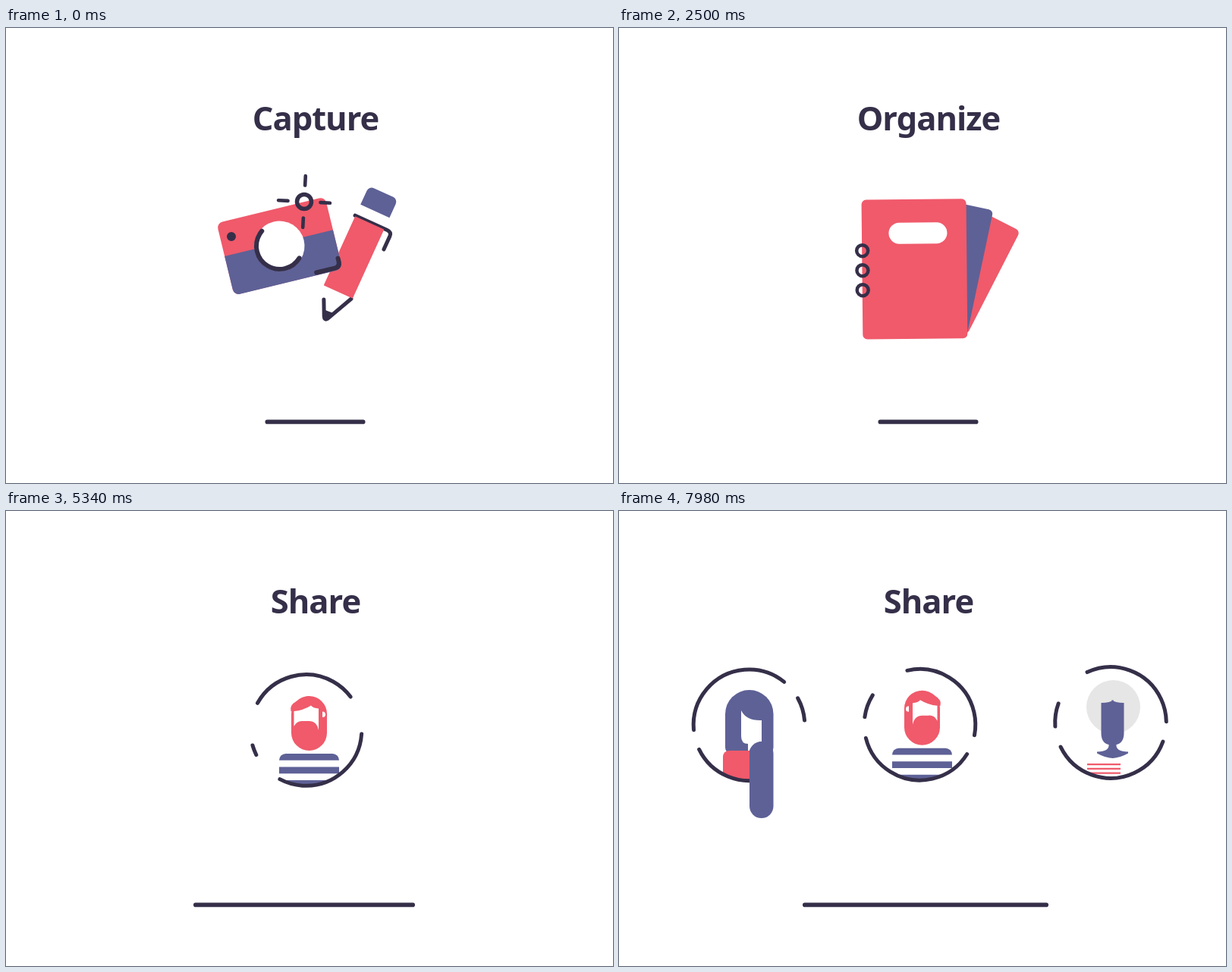
Animation, 800 px wide and 600 px high, one loop 8000 ms. Source, as an HTML page with a canvas:

```html
<!DOCTYPE html>
<html lang="en">
<head>
<meta charset="utf-8">
<title>Capture, Organize, Share</title>
<style>
html, body { margin: 0; width: 100%; height: 100%; overflow: hidden; background: #fff; }
canvas { display: block; width: 800px; height: 600px; }
</style>
</head>
<body>
<canvas id="stage" width="800" height="600"></canvas>
<script>
const c = document.getElementById('stage').getContext('2d');
const LOOP = 8000, DARK = '#352f49', RED = '#f05a6b', BLUE = '#5e6196', GREY = '#e6e6e6', WHITE = '#fff';
const RAD = Math.PI / 180;

// Motion helpers
const unit = (t, a, b) => Math.min(1, Math.max(0, (t - a) / (b - a)));
const ease = (t, a, b) => { const u = unit(t, a, b); return u * u * (3 - 2 * u); };
const hump = (t, a, b) => Math.sin(Math.PI * unit(t, a, b)) ** 2;
const mix = (a, b, u) => a.map((v, i) => v + (b[i] - v) * u);
function bezier(points, u) {
  while (points.length > 1) points = points.slice(1).map((p, i) => mix(points[i], p, u));
  return points[0];
}

// Drawing helpers
function at(x, y, deg, scale, draw) {
  c.save();
  c.translate(x, y);
  c.rotate(deg * RAD);
  c.scale(scale, scale);
  draw();
  c.restore();
}
function rect(x, y, w, h, r, color) {
  if (w <= 0 || h <= 0) return;
  c.fillStyle = color;
  c.beginPath();
  c.roundRect(x, y, w, h, r);
  c.fill();
}
function disc(x, y, r, color) {
  c.fillStyle = color;
  c.beginPath();
  c.arc(x, y, r, 0, 7);
  c.fill();
}
function shape(d, color) {
  c.fillStyle = color;
  c.fill(new Path2D(d));
}
function stroke(d, width) {
  c.strokeStyle = DARK;
  c.lineWidth = width;
  c.stroke(new Path2D(d));
}
function arc(x, y, r, from, to, width) {
  if (width <= 0) return;
  c.strokeStyle = DARK;
  c.lineWidth = width;
  c.beginPath();
  c.arc(x, y, r, from * RAD, to * RAD);
  c.stroke();
}
const ring = (x, y, r, width) => arc(x, y, r, 0, 360, width);
// Box by centre, size, angle, top and bottom corner radius
function box([x, y, w, h, deg, r, r2 = r], color) {
  at(x, y, deg, 1, () => rect(-w / 2, -h / 2, w, h, [r, r, r2, r2], color));
}
// Gooey streak along a path over the last 50 ms
function trail(pos, t, width, color) {
  c.strokeStyle = color;
  c.lineWidth = width;
  c.beginPath();
  for (let i = 0; i <= 10; i++) c.lineTo(...pos(t - 50 + 5 * i));
  if (width > 0) c.stroke();
}
function title(word, alpha) {
  c.globalAlpha = alpha;
  c.fillStyle = DARK;
  c.fillText(word, 408, 135);
  c.globalAlpha = 1;
}

function ground(t) {
  const mid = 407.5 - 14.5 * ease(t, 4720, 4960) + 11 * ease(t, 7400, 7980);
  const half = 66 - 28 * hump(t, 780, 1330) + 66 * hump(t, 1330, 1950)
    - 28 * hump(t, 3950, 4390) + 80 * ease(t, 4390, 4750) + 16 * ease(t, 7400, 7980);
  stroke(`M${mid - half + 2.8} 519.4H${mid + half - 2.8}`, 5.6);
}

// Binder pose: cover x, y, angle; hinge x, y; angles of the two pages
const upright = [389.5, 318, -.5, 458.5, 405, 12, 27.2];
const tilted = [381, 310.5, -12.2, 465, 383, 3.8, 16.2];
const coverSize = [138, 184];
function page(x, y, deg, w, h) {
  const s = Math.sin(deg * RAD), k = Math.cos(deg * RAD);
  return [x - w / 2 * k + h / 2 * s, y - w / 2 * s - h / 2 * k, w, h, deg, 6, 6];
}
const coverBox = ([x, y, deg]) => [x, y, ...coverSize, deg, 6, 6];
const redPage = (p, k = 1) => page(p[3], p[4], p[6], 60 * k, 154 * k);
const bluePage = (p, k = 1) => page(p[3], p[4], p[5], 60 * k, 168 * k);

// Parts leave the first scene, scatter, then gather as the binder
function flight(from, far, home, t) {
  const p = mix(mix(from, far, ease(t, 780, 1500)), home, ease(t, 1580, 2130));
  p[1] -= 45 * hump(t, 760, 1250);
  return p;
}
const ringHome = y => [upright[0] - 68.5, upright[1] + y, 7.5, 4.5];

function flashRing(t) {
  const gather = ease(t, 1580, 2130);
  const pos = s => mix(bezier([[393, 229], [360, 420], [400, 60], [475, 65]], unit(s, 1000, 1640)), ringHome(-25), ease(s, 1580, 2130));
  const [x, y] = pos(t), [px, py] = pos(t - 50);
  const r = 9.5 - 2 * ease(t, 1000, 1300);
  c.strokeStyle = DARK;
  c.lineWidth = 5.5 - 1.5 * ease(t, 1000, 1300) + .5 * gather;
  at(x, y, Math.atan2(py - y, px - x) / RAD, 1, () => {
    c.beginPath();
    c.roundRect(-r, -r, Math.hypot(x - px, y - py) + 2 * r, 2 * r, r);
    c.stroke();
  });
}
function pencil(k, sway) {
  at(458.5, 302.5, 24.5 + sway, k, () => {
    rect(-21, -94, 42, 27, [7, 7, 0, 0], BLUE);
    shape('M-8.4 79L6.4 78L2 88L-3.5 87Z', DARK);
    stroke('M-21.5 -51H25Q31.5 -51 31.5 -45V-26', 5);
    stroke('M-13 67L-3.5 87Q-1 92 2 88L19.5 51', 5);
  });
}
function cameraDetails(k, sway) {
  at(360.5, 287.5, -13.7 + sway, k, () => {
    stroke('M39 45.5H64Q71 45.5 71 38V34', 6);
    disc(0, 0, 33, WHITE);
    arc(0, 0, 30.5, 45, 234, 6);
  });
}
function rays(k) {
  for (let i = 0; i < 4 && k > 0; i++)
    at(393, 229, 3 + i * 90, 1, () => stroke(`M${34 - 12.5 * k} 0H34`, 4.6 * k));
}

function capture(t) {
  const sway = .7 * Math.sin(2 * Math.PI * unit(t, 0, 780)), k = 1 - ease(t, 780, 900);
  const cover = flight([458.5, 302.5, 42, 100, 24.5 + sway, 1, 1], [282, 325.5, 140, 186, -25.8, 7, 7], coverBox(upright), t);
  const red = flight([360.5, 287.5, 147, 98, -13.7 + sway, 8, 8], [424.5, 407, 142, 103, -9.7, 6, 6], redPage(upright), t);
  const blue = flight([365.8, 309.4, 147, 53, -13.7 + sway, 0, 8], [410.5, 407, 142, 103, -9.7, 6, 6], bluePage(upright), t);
  if (k) pencil(k, sway);
  if (t < 1100) box(cover, RED);
  box(red, RED);
  box(blue, BLUE);
  if (k) cameraDetails(k, sway);
  if (t >= 1100) box(cover, RED);
  slot(t, cover);
  ring(...flight([297, 275, 3, 6], [115.5, 336, 2.9, 5.8], ringHome(1), t));
  if (t > 800) ring(...flight([421, 381, 0, 0], [269, 432, 2.9, 5.8], ringHome(27), t));
  rays(1 - ease(t, 740, 860));
  flashRing(t);
}

// White label, later the hollow of the red frame
function slot(t, [x, y, , , deg]) {
  const grow = ease(t, 2000, 2300);
  const label = [5, -47.5, 77 * grow, 28 * grow, 14 * grow];
  const [ox, oy, w, h, r] = mix(mix(label, [0, 0, 56, 29, 8], ease(t, 4000, 4560)), [-3.5, -6, 32, 22, 6], ease(t, 4600, 4950));
  at(x, y, deg, 1, () => rect(ox - w / 2, oy - h / 2, w, h, r, WHITE));
}

function binder(t) {
  const pose = mix(upright, tilted, ease(t, 2450, 3500));
  const fan = hump(t, 3950, 4320);
  pose[5] += 10 * fan;
  pose[6] += 18 * fan;
  const fold = 1 - ease(t, 4080, 4340);
  const tab = (i, [x, y, w, h, deg], color) => {
    const g = ease(t, 2600 + i * 200, 2900 + i * 200) * (1 - ease(t, 3940, 4080));
    if (g) at(x, y, deg, 1, () => rect(w / 2 - 8, h / 2 - 169 + i * 35, 8 + 12 * g, 32, 5, color));
  };
  const red = redPage(pose, fold), blue = bluePage(pose, fold);
  const frame = mix(coverBox(pose), [409.5, 289.5, 68, 41, -24.2, 4, 4], ease(t, 4000, 4560));
  const cover = mix(frame, [399.5, 280, 47, 72, 0, 23.5, 23.5], ease(t, 4600, 4950));
  box(red, RED);
  tab(2, red, RED);
  box(blue, BLUE);
  tab(1, blue, BLUE);
  box(cover, RED);
  tab(0, cover, RED);
  slot(t, cover);
  const k = 1 - ease(t, 3980, 4240);
  at(pose[0], pose[1], pose[2], 1, () => {
    for (let i = -1; i < 2; i++) ring(-68.5, 1 + 26 * i * k, 7.5 * k, 4.5 * k);
  });
}

// Drops swirling around the middle portrait
function swirl(t) {
  const spiral = (deg, radius) => s => {
    const a = (deg + .31 * (s - 4580)) * RAD, r = radius(s);
    return [396 + r * Math.cos(a), 289 + r * Math.sin(a)];
  };
  const born = ease(t, 4200, 4400);
  trail(spiral(-141, s => 40 + 65 * hump(s, 4200, 4800)), t, 23 * born * (1 - ease(t, 4850, 5000)), BLUE);
  trail(spiral(-90, s => 73 + 69 * hump(s, 4200, 4960)), t, 14 * born * (1 - ease(t, 4900, 5150)), DARK);
}

// Broken circle whose arcs grow back from their ends
const arcs = [[-137, -21], [-2, 134], [154, 180]];
function orbit(x, y, turn, t, born, hidden = 0) {
  arcs.forEach(([from, to], i) => {
    const g = ease(t, born + i * 90, born + i * 90 + 330);
    const span = (to - from - (i ? 0 : hidden)) * g;
    if (span > 3) arc(x, y, 73.3, to - span + turn + 1, to + turn - 1, 5);
  });
}
function inCircle(x, y, draw) {
  c.save();
  c.beginPath();
  c.arc(x, y, 74, 0, 7);
  c.clip();
  draw();
  c.restore();
}
const spin = t => .0181 * (t - 6160);

function beardedPortrait(t) {
  const lift = ease(t, 6160, 8050), x = 395.5 + lift, y = 289 - 7.3 * lift;
  inCircle(x, y, () => {
    const top = y + 31 + 48 * (1 - ease(t, 4950, 5250));
    for (let i = 0; i < 3; i++) rect(360, top + 17.5 * i, 79, 8.7, i ? 0 : [9, 9, 0, 0], BLUE);
  });
  c.save();
  c.translate(399.5, y - 289);
  c.scale(1 - 2 * ease(t, 7150, 7400), 1);
  rect(-23.5, 244, 47, 72, 23.5, RED);
  shape('M-24 264Q-26 256 -17 251Q-8 245 0 244L6 256Q-4 258 -10 262Q-18 265 -24 264Z', RED);
  shape('M-20 264Q-8 263 2.5 256.5Q5 260 12.5 260.5V289Q10 277 0 277H-8Q-16 276 -20 284Z', WHITE);
  shape('M17.5 264.5Q21.5 264.5 21.5 268.5Q21.5 272 17.5 272Z', WHITE);
  c.restore();
  orbit(x, y, spin(t), t, 5000);
}

function longHairPortrait(t) {
  const dx = 4.2 * (1 - ease(t, 6000, 6800)), dy = 2.7 * (1 - ease(t, 7000, 7980));
  const hair = ease(t, 6190, 6400), braid = ease(t, 6350, 6650);
  at(dx, dy, 0, 1, () => {
    if (hair) {
      at(172, 268, 0, .45 + .55 * hair, () => rect(-32, -32, 63.5, 84, [31.7, 31.7, 8, 8], BLUE));
      inCircle(171.5, 282.3, () => rect(137, 361 - 45 * ease(t, 6270, 6500), 35, 50, [8, 0, 0, 0], RED));
      c.globalAlpha = braid;
      shape('M161 263Q168 277 188 276V304C180 305 174 310 172 316H170V307Q161 307 161 297Z', WHITE);
      c.globalAlpha = 1;
    }
    orbit(171.5, 282.3, 209 - spin(t), t, 6020, 31);
    if (braid) rect(172, 304, 31.5, 20 + 81 * braid, 15.7, BLUE);
  });
}

function curlyPortrait(t) {
  const head = ease(t, 7680, 7850);
  disc(651.5, 258.5, 35.5 * ease(t, 7580, 7820), GREY);
  at(650.5, 280, 0, head, () => {
    // Right half of head, neck and collar, mirrored for the left
    for (const side of [1, -1]) {
      c.save();
      c.scale(side, 1);
      shape('M-1 -31Q3 -27 15 -27V13C15 22 11 27 5 28Q4 37 20.5 37.5V39.5Q9 46 -1 46Z', BLUE);
      c.restore();
    }
  });
  inCircle(648, 279, () => {
    for (let i = 0; i < 3; i++) rect(617, 333 + 5.7 * i, 44 * ease(t, 7740, 7980), 2.3, 0, RED);
  });
  orbit(648, 279, 21 + spin(t) - spin(7980), t, 7400);
}

// Drops thrown from the middle portrait to the sides
function drop(t, start, end, width, color, points) {
  if (t < start || t > end) return;
  const size = ease(t, start, start + 100) * (1 - .5 * ease(t, end - 50, end));
  trail(s => bezier(points, unit(s, start, end)), t, width * size, color);
}
function share(t) {
  if (t >= 6000) longHairPortrait(t);
  beardedPortrait(t);
  if (t >= 7400) curlyPortrait(t);
  drop(t, 5930, 6230, 33, BLUE, [[385, 335], [195, 330], [252, 200], [172, 230]]);
  drop(t, 5863, 6293, 23, RED, [[385, 310], [238, 200], [250, 385], [190, 345]]);
  drop(t, 7240, 7730, 30, BLUE, [[420, 295], [540, 270], [620, 200], [650, 280]]);
  drop(t, 7280, 7790, 18, RED, [[405, 330], [480, 390], [560, 390], [635, 341]]);
}

function draw(t) {
  c.fillStyle = WHITE;
  c.fillRect(0, 0, 800, 600);
  c.lineCap = c.lineJoin = 'round';
  c.font = 'bold 43.5px "Noto Sans", "Open Sans", sans-serif';
  c.letterSpacing = '-1px';
  c.textAlign = 'center';
  title('Capture', 1 - ease(t, 840, 1080));
  title('Organize', ease(t, 1400, 1740) * (1 - ease(t, 4120, 4400)));
  title('Share', ease(t, 4640, 4900));
  ground(t);
  if (t < 2150) capture(t);
  else if (t < 4950) binder(t);
  else share(t);
  if (t >= 4200 && t < 5150) swirl(t);
}

function tick() {
  draw(performance.now() % LOOP);
  requestAnimationFrame(tick);
}
tick();
</script>
</body>
</html>
```
